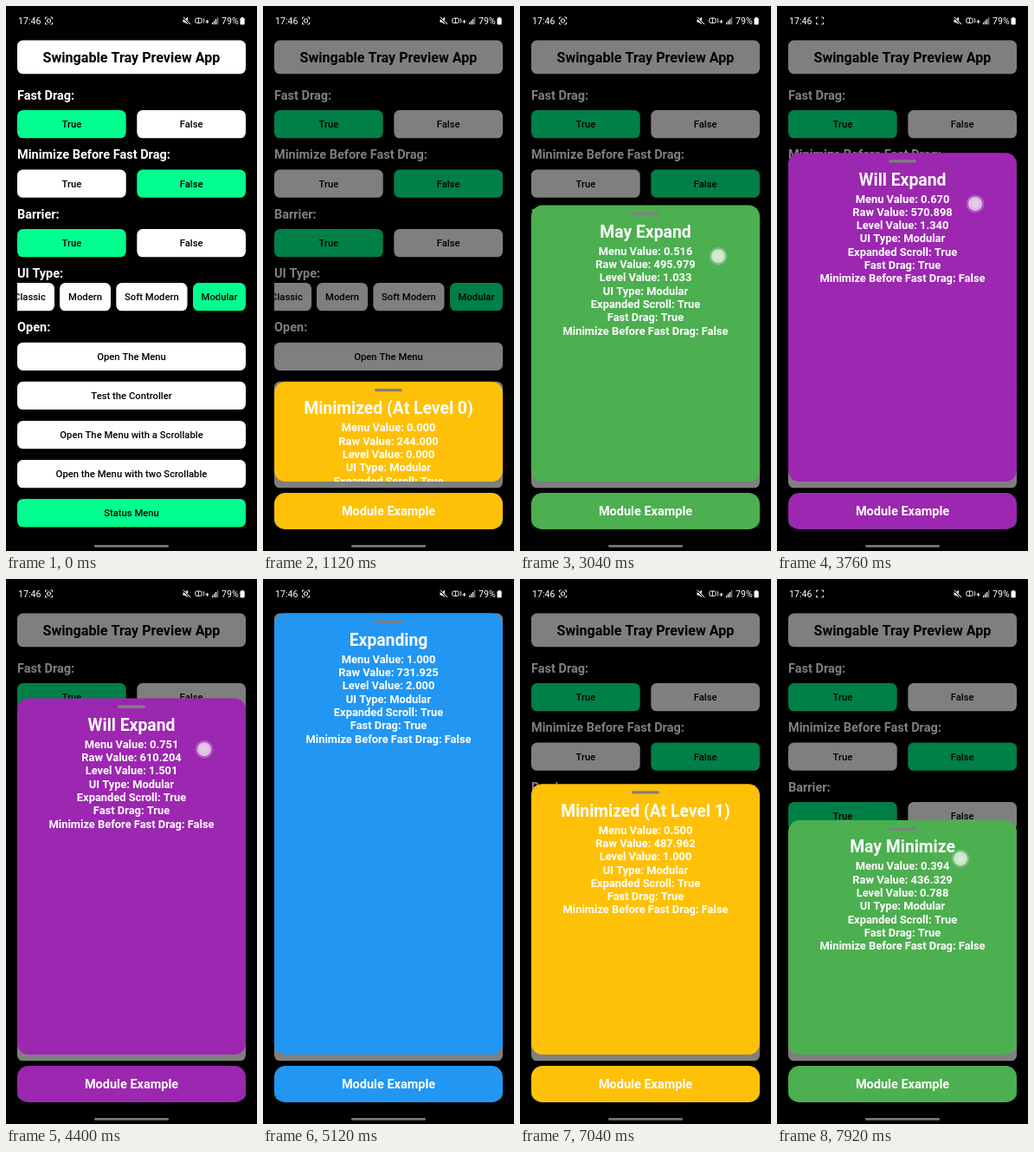
Recreate the animation shown at these times as an HTML page with a canvas. Size 290 px wide and 628 px high, loop 8000 ms.

```html
<!DOCTYPE html>
<html lang="en">
<head>
<meta charset="utf-8">
<title>Sliding menu</title>
<style>
html, body { margin: 0; width: 100%; height: 100%; overflow: hidden; background: #000; }
canvas { display: block; width: 290px; height: 628px; }
</style>
</head>
<body>
<canvas id="stage"></canvas>
<script>
const W = 290, H = 628, LOOP = 8000;
const TRAVEL = 393.5, REST_TOP = 433, SLOP = 14.5;
const RAW_MIN = 244, RAW_SPAN = 487.925;
const MINT = '#00ff8f', AMBER = '#ffc107', BLUE = '#2196f3', PURPLE = '#9c27b0', GREEN = '#4caf50';
const OPEN_AT = 400, SETTLE = 320, LAG = 4;

// Each drag: path of [time, menu value], the value it snaps to, and the finger's start
const DRAGS = [
  { path: [[1900, 0], [2160, 0.1019]], to: 0.5, x: 211, y: 439.6 },
  { path: [[2960, 0.5], [3756, 0.66985], [4790, 0.8]], to: 1, x: 229, y: 309.5 },
  { path: [[5640, 1], [6316, 0.79213], [6680, 0.72]], to: 0.5, x: 215, y: 223.7 },
  { path: [[7360, 0.5], [7916, 0.39431], [8400, 0.33]], to: 0, x: 212, y: 265.8 }
];

const canvas = document.getElementById('stage');
const ctx = canvas.getContext('2d');
const dpr = window.devicePixelRatio || 1;
canvas.width = W * dpr;
canvas.height = H * dpr;

const clamp = x => Math.max(0, Math.min(1, x));

// cubic-bezier(.25, .1, .25, 1)
function ease(p) {
  if (p <= 0 || p >= 1) return clamp(p);
  let lo = 0, hi = 1, s = 0.5;
  for (let i = 0; i < 24; i++) {
    s = (lo + hi) / 2;
    if (0.75 * s * (1 - s) + s ** 3 < p) lo = s; else hi = s;
  }
  return 0.3 * (1 - s) ** 2 * s + 3 * (1 - s) * s * s + s ** 3;
}

function follow(path, t) {
  for (let i = 1; i < path.length; i++) {
    const [t0, v0] = path[i - 1], [t1, v1] = path[i];
    if (t <= t1) return v0 + (v1 - v0) * clamp((t - t0) / (t1 - t0));
  }
  return path[path.length - 1][1];
}

const startOf = d => d.path[0][0];
const endOf = d => d.path[d.path.length - 1][0];
const goesUp = d => d.to > d.path[0][1];
const lastDrag = t => DRAGS.filter(d => t > startOf(d)).pop();

function valueAt(t) {
  const d = lastDrag(t);
  if (!d) return 0;
  const v = follow(d.path, t);
  return v + (d.to - v) * ease((t - endOf(d)) / SETTLE);
}

function statusAt(t) {
  const d = lastDrag(t);
  if (!d) return ['Minimized (At Level 0)', AMBER];
  const verb = goesUp(d) ? 'Expand' : 'Minimiz';
  if (t > endOf(d) + 335) return [`${verb}ed (At Level ${d.to * 2})`, AMBER];
  if (t > endOf(d)) return [verb + 'ing', BLUE];
  const word = goesUp(d) ? 'Expand' : 'Minimize';
  const moved = Math.abs(valueAt(t) - d.path[0][1]) * 2;
  return moved > 1 / 3 ? ['Will ' + word, PURPLE] : ['May ' + word, GREEN];
}

function box(x, y, w, h, r, fill) {
  ctx.beginPath();
  ctx.roundRect(x, y, w, h, r);
  ctx.fillStyle = fill;
  ctx.fill();
}

function text(str, x, mid, size, weight, fill, align = 'center') {
  ctx.font = `${weight} ${size}px Roboto, sans-serif`;
  ctx.textAlign = align;
  ctx.fillStyle = fill;
  ctx.fillText(str, x, mid + size * 0.355);
}

function line(pts, width = 1, color = '#fff') {
  ctx.beginPath();
  pts.forEach(([x, y], i) => i ? ctx.lineTo(x, y) : ctx.moveTo(x, y));
  ctx.lineWidth = width;
  ctx.strokeStyle = color;
  ctx.stroke();
}

function disc(x, y, r, fill) {
  ctx.beginPath();
  ctx.arc(x, y, r, 0, Math.PI * 2);
  ctx.fillStyle = fill;
  ctx.fill();
}

function button(label, x, y, w, on) {
  box(x, y, w, 32.3, 6.5, on ? MINT : '#fff');
  text(label, x + w / 2, y + 16.2, 11.28, 500, '#000');
}

function drawPage() {
  box(13, 39.5, 264, 38.7, 6.5, '#fff');
  text('Swingable Tray Preview App', 145, 59.3, 16.1, 700, '#000');
  const heads = [['Fast Drag:', 102.5], ['Minimize Before Fast Drag:', 171], ['Barrier:', 239.5],
    ['UI Type:', 308], ['Open:', 370]];
  heads.forEach(([s, y]) => text(s, 13, y, 14.5, 700, '#fff', 'left'));
  [true, false, true].forEach((on, i) => {
    const y = 120 + i * 68.5;
    button('True', 13, y, 125.7, on);
    button('False', 151.3, y, 125.7, !on);
  });

  ctx.save();
  ctx.beginPath();
  ctx.rect(13, 315, 264, 40);
  ctx.clip();
  button('Classic', -1, 319, 57, false);
  button('Modern', 62, 319, 59, false);
  button('Soft Modern', 127.3, 319, 82.2, false);
  button('Modular', 216, 319, 61, true);
  ctx.restore();

  ['Open The Menu', 'Test the Controller', 'Open The Menu with a Scrollable',
    'Open the Menu with two Scrollable', 'Status Menu'
  ].forEach((s, i) => button(s, 13, 387.7 + i * 45.1, 264, i === 4));
}

function drawMenu(t) {
  const k = ease((t - OPEN_AT) / SETTLE);
  if (k <= 0) return;
  ctx.fillStyle = `rgba(0,0,0,${0.5 * k})`;
  ctx.fillRect(0, 0, W, H);

  const top = REST_TOP - TRAVEL * valueAt(t);
  const v = valueAt(t - LAG);
  const [title, color] = statusAt(t);
  ctx.save();
  ctx.translate(0, (1 - k) * (H - REST_TOP));
  box(13, 561, 264, 42, 12.9, color);
  text('Module Example', 145, 582.3, 14.5, 700, '#fff');
  box(13, top, 264, 548 - top, 12.9, color);
  ctx.clip();
  box(129, top + 8, 32, 3.3, 1.6, '#808080');
  text(title, 145, top + 30.5, 19.33, 700, '#fff');
  [
    'Menu Value: ' + v.toFixed(3),
    'Raw Value: ' + (RAW_MIN + RAW_SPAN * v).toFixed(3),
    'Level Value: ' + (2 * v).toFixed(3),
    'UI Type: Modular',
    'Expanded Scroll: True',
    'Fast Drag: True',
    'Minimize Before Fast Drag: False'
  ].forEach((s, i) => text(s, 145, top + 52.8 + i * 15.3, 12.89, 700, '#fff'));
  ctx.restore();
}

function drawFinger(x, y, alpha) {
  if (alpha <= 0) return;
  ctx.save();
  ctx.globalAlpha = alpha;
  disc(x, y, 10.5, 'rgba(255,255,255,.22)');
  disc(x, y, 8, 'rgba(255,255,255,.62)');
  disc(x, y, 4, 'rgba(255,255,255,.2)');
  ctx.restore();
}

function drawTouch(t) {
  const fade = end => 1 - clamp((t - end) / 130);
  if (t > 200 && t < 460) drawFinger(212, 584, fade(330));
  for (const d of DRAGS) {
    const down = startOf(d) - 120;
    if (t < down || t > endOf(d) + 130) continue;
    const dir = goesUp(d) ? -1 : 1;
    const pulled = Math.abs(follow(d.path, t) - d.path[0][1]) * TRAVEL;
    const y = d.y + dir * (SLOP * clamp((t - down) / 120) + pulled);
    drawFinger(d.x, y, fade(endOf(d)));
  }
}

function drawSystem(t) {
  text('17:46', 14, 17.3, 10.6, 400, '#fff', 'left');
  // Recording mark: corners stay, the lens blinks
  for (const sx of [-1, 1]) for (const sy of [-1, 1]) {
    const x = 49.5 + sx * 4, y = 17 + sy * 4;
    line([[x - sx * 2.2, y], [x, y], [x, y - sy * 2.2]], 0.9);
  }
  if (t % 1000 < 500) {
    ctx.beginPath();
    ctx.arc(49.5, 17, 2.2, 0, Math.PI * 2);
    ctx.lineWidth = 1;
    ctx.stroke();
  }
  // Muted speaker
  ctx.beginPath();
  [[204.5, 15.5], [206.5, 15.5], [210, 12.8], [210, 21], [206.5, 18.8], [204.5, 18.8]]
    .forEach(p => ctx.lineTo(...p));
  ctx.fillStyle = '#fff';
  ctx.fill();
  line([[204.5, 13], [213, 21.5]], 2, '#000');
  line([[204.8, 12.7], [213.2, 21.2]], 1);
  // Call and data marks
  ctx.beginPath();
  ctx.roundRect(218.8, 14, 7.4, 5.6, 1.8);
  ctx.lineWidth = 1;
  ctx.stroke();
  line([[222.5, 14], [222.5, 19.6]], 0.8);
  line([[228, 14], [229, 17], [228, 19.6]], 0.9);
  line([[230.5, 18], [234.5, 18]], 1);
  line([[232.5, 16], [232.5, 20]], 1);
  for (let i = 0; i < 4; i++) {
    box(238 + i * 2, 19 - i * 2, 1.2, 2.2 + i * 2, 0, i < 3 ? '#fff' : '#888');
  }
  text('79%', 249, 17.3, 10.6, 400, '#fff', 'left');
  box(270.5, 13.8, 5.2, 7.8, 1, '#fff');
  box(272, 12.8, 2.2, 1.5, 0, '#fff');
  box(102, 621, 86, 2.8, 1.4, '#777');
}

function frame(now) {
  const t = now % LOOP;
  ctx.setTransform(dpr, 0, 0, dpr, 0, 0);
  ctx.fillStyle = '#000';
  ctx.fillRect(0, 0, W, H);
  drawPage();
  drawMenu(t);
  drawSystem(t);
  drawTouch(t);
}

const began = performance.now();
function tick() {
  frame(performance.now() - began);
  requestAnimationFrame(tick);
}
tick();
</script>
</body>
</html>
```
